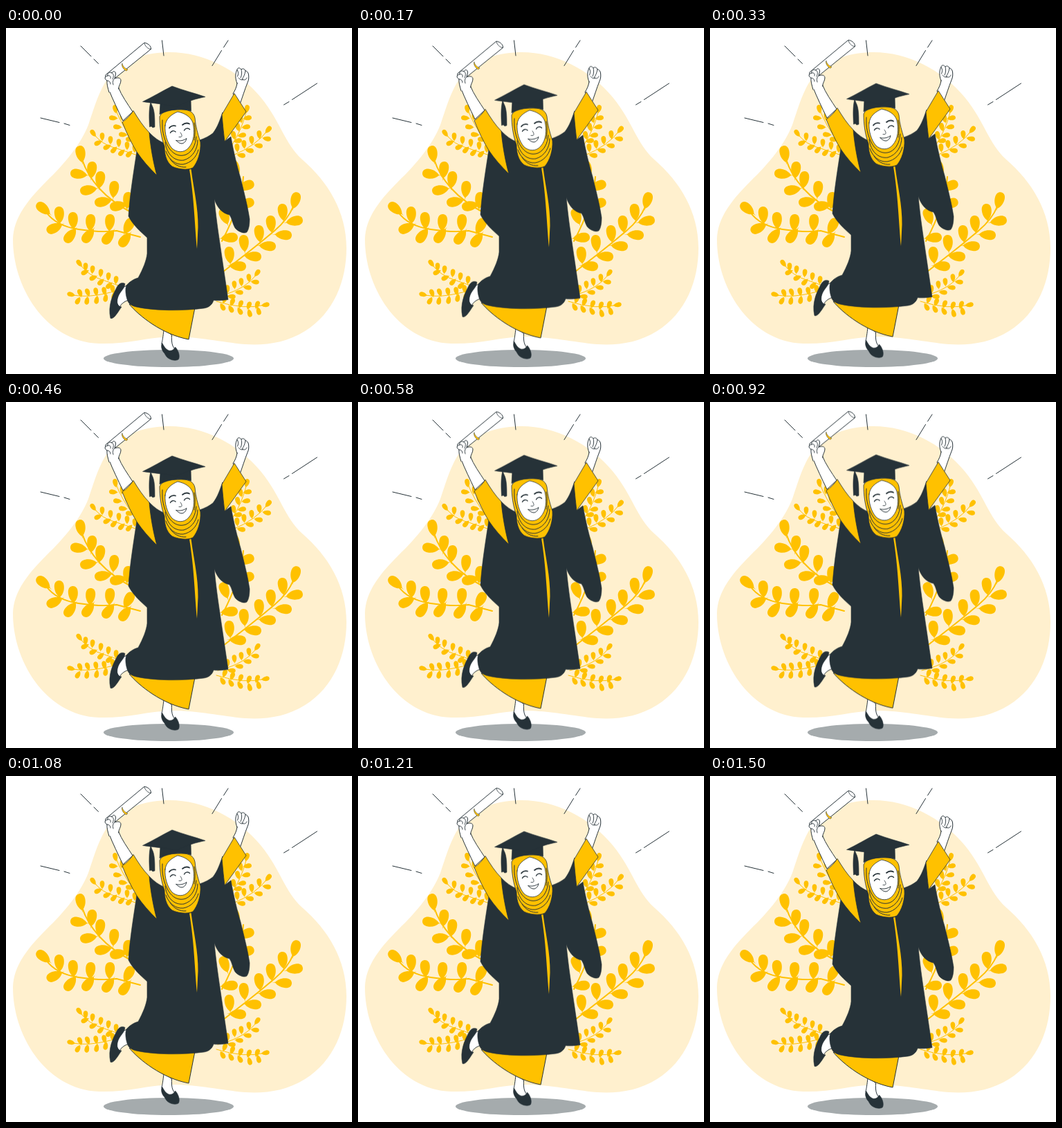
Animation, 500 px wide and 500 px high, one loop 1540 ms. Source, as an HTML page:

```html
<!DOCTYPE html>
<html lang="en">
<head>
<meta charset="utf-8">
<title>Graduate jumping for joy</title>
<style>
  html, body { margin: 0; height: 100%; overflow: hidden; background: #fff; }
  svg { display: block; width: 100vw; height: 100vh; }
  .line { fill: none; stroke: #263238; stroke-linecap: round; stroke-linejoin: round; }
  .skin { fill: #fff; stroke: #263238; stroke-linecap: round; stroke-linejoin: round; }
  .gold { fill: #ffc100; stroke: #263238; stroke-linejoin: round; }
  .dark { fill: #263238; stroke: #263238; stroke-width: .6; stroke-linejoin: round; }
  .stem { fill: none; stroke: #ffc100; stroke-linecap: round; }
  #girl { animation: float 1540ms steps(18) -2ms infinite; }
  /* 24 steps a second, 10 px up and back, then a short rest */
  @keyframes float {
    0% { transform: translateY(0); }
    48.7% { transform: translateY(-10px); }
    97.4%, 100% { transform: translateY(0); }
  }
</style>
</head>
<body>
<svg viewBox="0 0 500 500">
  <defs>
    <path id="leaf" d="M0 16L-.5 12C-4 9-7 4-7-3C-7-9-4-12 0-12C4-12 7-9 7-3C7 4 4 9 .5 12Z"/>
  </defs>

  <path fill="#fff0ce" d="M237 35C285 35 335 60 368 100C398 137 402 166 428 190C465 222 492 265 492 318C492 365 474 412 432 438C405 455 375 459 345 457C310 454 280 446 238 446C205 447 175 457 135 456C95 455 62 432 42 404C20 373 10 338 10 305C11 275 30 250 58 222C85 196 108 168 119 140C130 108 135 88 152 66C172 44 205 35 237 35Z"/>
  <g id="plants" fill="#ffc100"></g>
  <path class="line" d="M108 26L123 41M127 45L133.500 51.500M225.500 18L228 40M321 18L314.500 28M311.500 32.500L298 54.500M449.500 80L413.500 103.500M409 106.500L401.500 111M50 130L77 136.500M84 138L92 140.500"/>
  <ellipse cx="235" cy="477.500" rx="94" ry="12.500" fill="#a5abad"/>

  <g id="girl">
    <!-- standing leg -->
    <path class="skin" d="M228 436C227 446 226 452 225 456L234 470L245 465C240 460 239 455 239.500 444Z"/>
    <path class="dark" d="M225.500 455C223.500 460 225 466 229 470C231 474 233 477 237 478.500C241 480.500 247 481 249.500 478.500C252 473 248 464 244.500 461C243 465 239 467 235 466C230 464 228 459 225.500 455Z"/>
    <!-- raised foot -->
    <path class="skin" d="M177 371C167 374 160 384 160 397L164 404C167 397 172 395 180 392Z"/>
    <path class="dark" d="M172 369.500C168 367 163 369 160.500 374C154 386 147 401 151 419.500C156 421.500 162 410 167 403C160 403 159 394 163 386C166 380 171 377 172 369.500Z"/>
    <!-- skirt and gown -->
    <path class="gold" d="M178 399C192 416 226 443 264 450L273 404Z"/>
    <path class="dark" d="M207 151C214 158 220 163 230 167L280 162C288 159 294 156 299 152C306 143 309 133 313 122L317 163L325 157C329 180 334 200 339 217C344 238 349 256 352 276C352 284 351 291 348 295C344 298 335 294 331 289C327 282 327 276 323 270C313 268 305 260 301 247C304 280 309 310 313 338L321 392.500C312 394 304 394 300 393.500C298 400 293 404 286 405C256 409 215 409 188 403C180 401 176 397 175 392C173 386 172 377 174 372C178 367 184 363 191 361C198 348 203 336 204 326L204 303C194 294 183 284 177 272C179 240 185 205 189 178Z"/>
    <path fill="#ffc100" d="M265 204.500L267.500 204C271 232 278 260 277.500 288L276 319C273 290 272 246 265 204.500Z"/>
    <!-- right arm -->
    <path class="skin" d="M334 80C333 86 331 90 328 95L338 110C342 99 345 89 349 79C351 75 351 71 350.500 67C350 64 348 62 346 62C345 59 342 58 340 60C338 57 335 57 334 60C331 66 331 73 334 80Z"/>
    <path class="line" d="M334.500 61C336 64 336 67 334.500 70M340 60C341 64 341 68 339 72M346 62C345 67 344 70 341 74C344 76 347 75 348 72M336 72C338 75 342 76 343 74" stroke-width=".9"/>
    <path class="gold" d="M330 94.500L347 121L316 164C314 148 313 136 312 125Z" stroke-width=".8"/>
    <!-- left arm and diploma -->
    <path class="skin" d="M149 90C154 103 162 119 169 134L183 121C176 110 167 98 162 85Z"/>
    <path class="gold" d="M184 119.500C191 131 198 142 207 151C209 173 213 195 218 213C207 202 197 191 189 179C181 166 174 151 168 136C174 132 180 126 184 119.500Z" stroke-width=".8"/>
    <path class="skin" d="M200 21.500C204 21 210 26 209.500 30.500L152 77C147 78 142 72 144 68Z"/>
    <path class="line" d="M200 21.500C200 25 205 31 209.500 30.500" stroke-width=".8"/>
    <path class="gold" d="M168 51C166 54 170 61 174 62L176 60C172 59 168 54 168 51Z" stroke-width=".5"/>
    <path class="skin" d="M149 93C147 86 145.500 81 146 76C142 74 142 70 147 69C146 65 150 63 153 65C156 60 160 64 158 69L157 73C162 71 166 72 166 76C166 80 163 83 162.500 88"/>
    <path class="line" d="M147 69C150 68 152 70 151 73M153 65C156 66 156 70 154 74M146 76C149 76 151 78 151 81M157 73C154 75 154 79 155 82" stroke-width=".9"/>
    <!-- scarf and face -->
    <path class="gold" d="M222 128C226 119 238 118 249 118C262 117 271 120 273 130C274 143 277 152 281 165C282 179 277 194 270 202C262 206 248 204 240 200C231 193 229 181 229 171C224 158 222 142 222 128Z" stroke-width=".8"/>
    <path class="skin" d="M230 141C231 131 239 125 248 121C258 123 267 128 270 137C273 150 272 164 264 173C257 181 247 180 240 174C233 166 229 153 230 141Z" stroke-width=".8"/>
    <path class="line" d="M226 133C225 147 228 159 233 169C239 181 249 187 260 183C269 179 274 169 275 157M230 165C232 182 243 193 257 191C270 187 277 175 277 162M231 178C235 190 245 198 256 197C267 195 275 187 278 176M237 189C242 197 251 202 260 201M272 137C274 146 273 155 272 162"/>
    <path class="line" d="M236 144.500C238 141.500 242 140.500 245 141.500M255 140C258 137.500 262 137 265 138.500" stroke-width="1.800"/>
    <path class="line" d="M237.500 151.500C239 148 243 148 245 150M257.500 148C259 145 263 144 265.500 146.500" stroke-width="1.400"/>
    <path class="line" d="M252 151C254 154 255 156 253 157.500L250 157.500" stroke-width=".8"/>
    <path class="skin" d="M246 162.500C251 164 257 162.500 261 159.500C260 164 257 167 254 167C251 167 248 165 246 162.500Z"/>
    <!-- cap -->
    <path class="dark" d="M223 107L267 102L267.500 120C255 116 236 117 222 125Z"/>
    <path class="dark" d="M197.500 106.500C211 100 226 91 240 84C256 90 272 94 288 99.500C276 102 260 106 247 114C230 110 214 109 197.500 106.500Z"/>
    <path class="dark" d="M209 107C206 118 207 133 207.500 143L210 142L212 144L215 143C215 131 215 119 211 112Z"/>
  </g>
</svg>
<script>
  const plants = document.getElementById('plants');

  // Leaves are grouped by heading: degrees clockwise from up -> centre points.
  function branch(stem, size, groups) {
    let svg = `<path class="stem" stroke-width="${size > .8 ? 2 : 1}" d="${stem}"/>`;
    for (const [angle, at] of Object.entries(groups))
      for (let i = 0; i < at.length; i += 2)
        svg += `<use href="#leaf" transform="translate(${at[i]} ${at[i + 1]}) rotate(${angle}) scale(${size})"/>`;
    plants.insertAdjacentHTML('beforeend', svg);
  }

  // left side
  branch('M110 190Q117 212 135 232T184 268', 1, {
    '-10': [108, 182],
    '5': [124, 205, 136, 219, 156, 233, 176, 249],
    '-82': [105, 211],
    '-100': [119, 234, 140, 251, 162, 257]
  });
  branch('M58 266Q72 286 105 291T160 293L194 302', 1, {
    '-50': [54, 261],
    '-3': [77, 270, 97, 278],
    '4': [122, 281, 150, 281],
    '28': [177, 286],
    '-115': [70, 289],
    '-142': [93, 300, 119, 300, 148, 302, 172, 306]
  });
  branch('M126 152Q138 169 160 174L190 184', .48, {
    '-35': [126, 152],
    '0': [139, 157, 151, 162, 163, 166, 175, 170, 186, 174],
    '-115': [133, 166, 146, 172],
    '-135': [156, 176, 167, 180, 178, 182]
  });
  branch('M158 116Q166 140 188 168', .5, {
    '-10': [158, 117],
    '5': [168, 127, 175, 139, 182, 149],
    '-85': [155, 130, 161, 143, 169, 154, 179, 161]
  });
  branch('M106 340Q117 358 145 366L174 376', .48, {
    '-35': [106, 340],
    '5': [125, 349, 137, 354, 148, 359, 159, 364],
    '0': [115, 345],
    '-115': [114, 353, 126, 361],
    '-135': [137, 367, 149, 372]
  });
  branch('M94 385Q118 392 162 379', .48, {
    '-75': [94, 385],
    '-20': [107, 383, 118, 382],
    '-10': [130, 381, 142, 380, 154, 377],
    '-150': [104, 394],
    '-170': [117, 394, 131, 393, 144, 390, 156, 387]
  });

  // right side
  branch('M378 148Q362 170 328 184', .5, {
    '40': [379, 147],
    '-5': [366, 154, 355, 162, 344, 168, 334, 173],
    '100': [377, 160, 365, 170, 352, 177, 340, 184]
  });
  branch('M348 118Q342 145 326 170', .5, {
    '15': [348, 117],
    '-15': [339, 131, 335, 143, 329, 155],
    '80': [349, 130, 347, 143, 341, 155, 335, 163]
  });
  branch('M415 258Q408 276 388 293T345 328L314 352', 1, {
    '15': [418, 249],
    '-5': [400, 266, 383, 283, 366, 297, 344, 311, 323, 328],
    '80': [417, 279],
    '93': [401, 299, 378, 315, 357, 330, 335, 344]
  });
  branch('M343 215Q340 255 312 308', 1, {
    '-20': [331, 203, 316, 272],
    '70': [347, 228, 347, 254],
    '85': [323, 303]
  });
  branch('M363 354Q348 378 306 388', .48, {
    '35': [363, 354],
    '-5': [351, 361, 340, 367, 330, 371, 320, 377],
    '95': [360, 367, 349, 375, 337, 382, 326, 388]
  });
  branch('M375 400Q345 408 304 395', .48, {
    '80': [375, 400],
    '20': [363, 400, 351, 401, 339, 399, 327, 396, 316, 392],
    '165': [365, 409, 352, 412],
    '150': [338, 409, 325, 406, 313, 403]
  });
</script>
</body>
</html>
```
